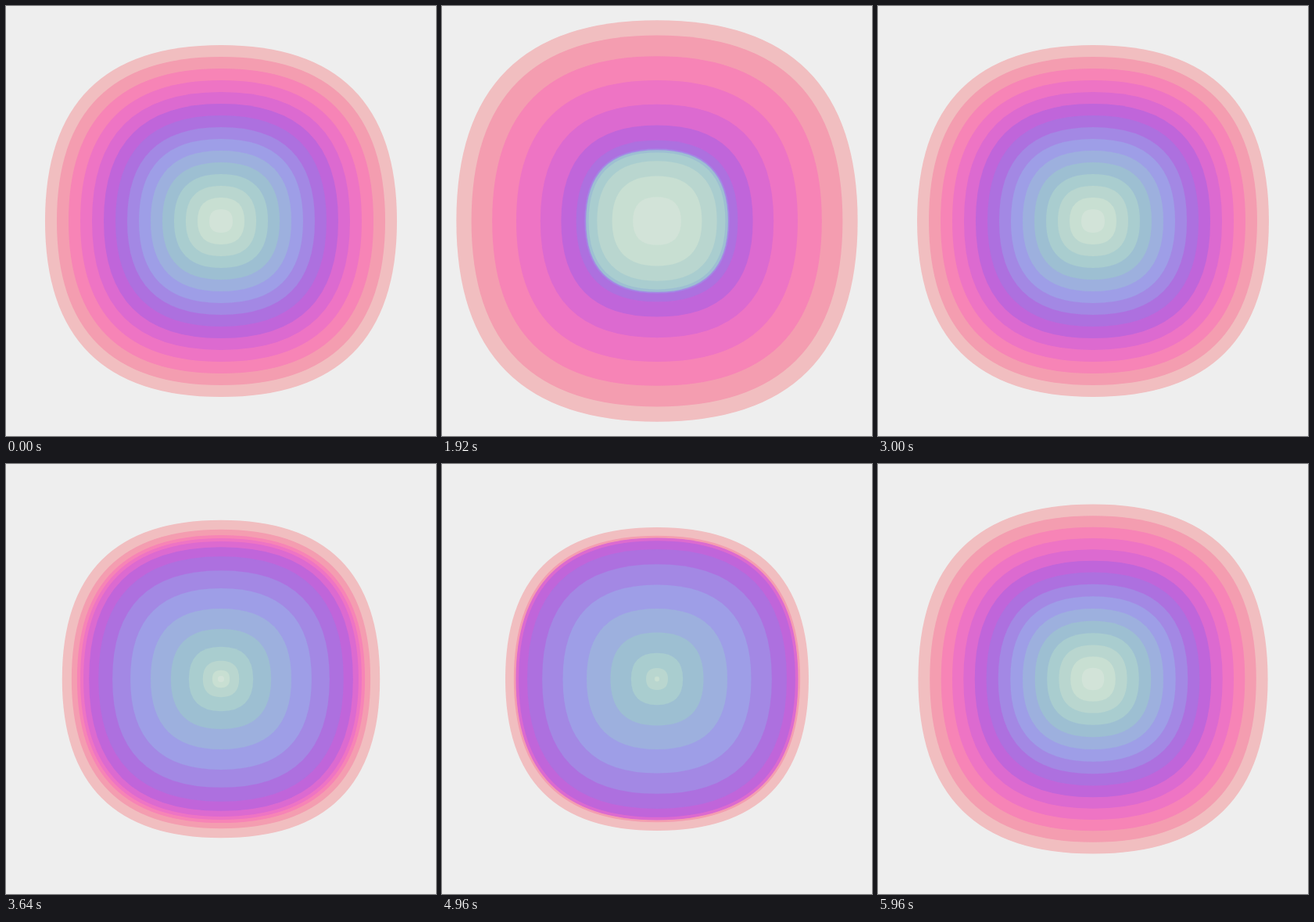
An HTML page with a canvas that plays this animation: 550x550 px, repeating every 6000 ms.

```html
<!DOCTYPE html>
<html lang="en">
<head>
<meta charset="utf-8">
<title>Breathing rings</title>
<style>
  html, body { margin: 0; width: 100%; height: 100%; overflow: hidden; background: #eee; }
  canvas { display: block; width: 550px; height: 550px; }
</style>
</head>
<body>
<canvas id="stage" width="550" height="550"></canvas>
<script>
const LOOP = 6000;
const CENTER = 275;
const STEP = 15;
const WAVELENGTH = 180;
const SWING = 35;

// Outermost ring first
const COLORS = [
  '#f1bec0', '#f49db0', '#f784b6', '#ee74c4', '#dc6ad0',
  '#c065da', '#ad70df', '#a388e4', '#9e9ee7', '#9db0de',
  '#9dbfd2', '#a9cdcf', '#b9d6cf', '#c8dfd2', '#d2e3d8'
];

const ctx = document.getElementById('stage').getContext('2d');

// Four quadratic arcs, each pulled towards a corner of the bounding square
function squircle(r, color) {
  ctx.beginPath();
  ctx.moveTo(0, -r);
  ctx.quadraticCurveTo(r, -r, r, 0);
  ctx.quadraticCurveTo(r, r, 0, r);
  ctx.quadraticCurveTo(-r, r, -r, 0);
  ctx.quadraticCurveTo(-r, -r, 0, -r);
  ctx.fillStyle = color;
  ctx.fill();
}

function draw(time) {
  const amp = SWING * Math.sin(2 * Math.PI * (time % LOOP) / LOOP);
  ctx.setTransform(1, 0, 0, 1, 0, 0);
  ctx.fillStyle = '#eee';
  ctx.fillRect(0, 0, 550, 550);
  ctx.translate(CENTER, CENTER);
  COLORS.forEach((color, i) => {
    const base = STEP * (COLORS.length - i);
    squircle(base + amp * Math.sin(2 * Math.PI * base / WAVELENGTH), color);
  });
}

const start = performance.now();

function tick() {
  draw(performance.now() - start);
  requestAnimationFrame(tick);
}

tick();
</script>
</body>
</html>
```
